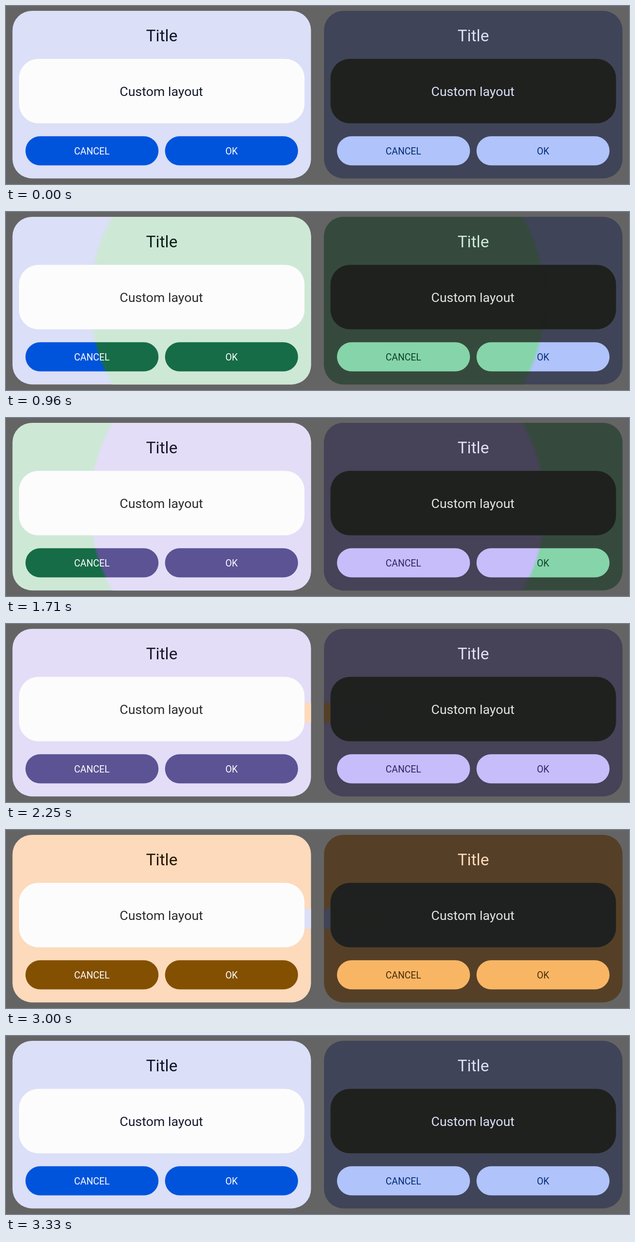
Write an HTML page that moves like this. It is 1280 px wide and 368 px high and loops after 3.42 s.

```html
<!DOCTYPE html>
<html lang="en">
<head>
<meta charset="utf-8">
<title>Dialog themes</title>
<style>
html, body { margin: 0; width: 100%; height: 100%; overflow: hidden; background: #646464; }
svg { display: block; width: 100%; height: 100%; }
text { font-family: Roboto, sans-serif; text-anchor: middle; }
</style>
</head>
<body>
<svg id="stage" viewBox="0 0 1280 368">
  <defs>
    <filter id="soft" filterUnits="userSpaceOnUse" x="-100" y="-500" width="1480" height="1400">
      <feGaussianBlur stdDeviation="2.2"/>
    </filter>
    <mask id="reveal" maskUnits="userSpaceOnUse" x="0" y="0" width="1280" height="368">
      <rect id="iris" fill="#fff" filter="url(#soft)"/>
    </mask>
  </defs>
</svg>
<script>
const LOOP = 3420, HOLD = 750, STEP = 30, STEPS = 12;
const CX = 640, CY = 183.5, CORE = 114, R0 = 20.5, GROW = 47.5;

// Each side: panel, title, card, body text, button, button label
const themes = [
  { light: ['#dbdff7', '#0f1429', '#fcfcfc', '#141a2e', '#0054dc', '#ffffff'],
    dark: ['#404458', '#dbdff7', '#1f211e', '#dbdff7', '#b0c3fa', '#002a78'] },
  { light: ['#cee8d6', '#0a1f15', '#fcfcfc', '#2b2c2b', '#166c47', '#ffffff'],
    dark: ['#354a3d', '#cee8d6', '#1f211f', '#e3e3e1', '#86d4a9', '#0a4029'] },
  { light: ['#e3ddf7', '#1a172c', '#fcfcfc', '#2b2c2b', '#5b5394', '#ffffff'],
    dark: ['#464257', '#e3ddf7', '#1f211f', '#e3e3e1', '#c7bdfa', '#2e2464'] },
  { light: ['#fcdabb', '#261604', '#fcfcfc', '#2b2c2b', '#835002', '#ffffff'],
    dark: ['#554027', '#fcdabb', '#1f2120', '#e3e3e1', '#f8b665', '#482b03'] }
];

const stage = document.getElementById('stage');
const iris = document.getElementById('iris');

function add(parent, tag, attrs, label) {
  const el = document.createElementNS(stage.namespaceURI, tag);
  for (const key in attrs) el.setAttribute(key, attrs[key]);
  if (label) el.textContent = label;
  return parent.appendChild(el);
}

function box(parent, x, y, width, height, rx, fill) {
  add(parent, 'rect', { x, y, width, height, rx, fill });
}

function write(parent, label, x, y, size, fill) {
  add(parent, 'text', { x, y, 'font-size': size, fill }, label);
}

function dialog(parent, dx, [panel, title, card, body, button, label]) {
  const g = add(parent, 'g', { transform: `translate(${dx} 0)` });
  box(g, 13.33, 10, 613.33, 346.4, 40, panel);
  write(g, 'Title', 320, 73.3, 33.33, title);
  box(g, 26.67, 109.2, 586.67, 133.3, 40, card);
  write(g, 'Custom layout', 319.2, 186, 26.67, body);
  box(g, 40, 269.2, 273.33, 60.4, 30.2, button);
  box(g, 326.67, 269.2, 273.33, 60.4, 30.2, button);
  write(g, 'CANCEL', 176.4, 307, 19.3, label);
  write(g, 'OK', 463.4, 307, 19.3, label);
}

const layers = themes.map(theme => {
  const g = add(stage, 'g', {});
  dialog(g, 0, theme.light);
  dialog(g, 640, theme.dark);
  return g;
});

function setIris(r) {
  const attrs = { x: CX - CORE - r, y: CY - r, width: 2 * (CORE + r), height: 2 * r, rx: r };
  for (const key in attrs) iris.setAttribute(key, attrs[key]);
}

let shown = '';

function draw() {
  const t = performance.now() % LOOP;
  const turn = Math.floor(t / HOLD);
  const step = Math.min(STEPS, Math.floor((t - turn * HOLD) / STEP));
  const state = turn + ':' + step;
  if (state !== shown) {
    shown = state;
    const top = layers[turn % layers.length];
    const moving = turn > 0 && step < STEPS - 1;
    const under = moving ? layers[turn - 1] : null;
    for (const g of layers) {
      g.style.display = g === top || g === under ? '' : 'none';
      g.removeAttribute('mask');
    }
    if (stage.lastElementChild !== top) stage.appendChild(top);
    if (moving) {
      setIris(R0 + GROW * step);
      top.setAttribute('mask', 'url(#reveal)');
    }
  }
  requestAnimationFrame(draw);
}
draw();
</script>
</body>
</html>
```
